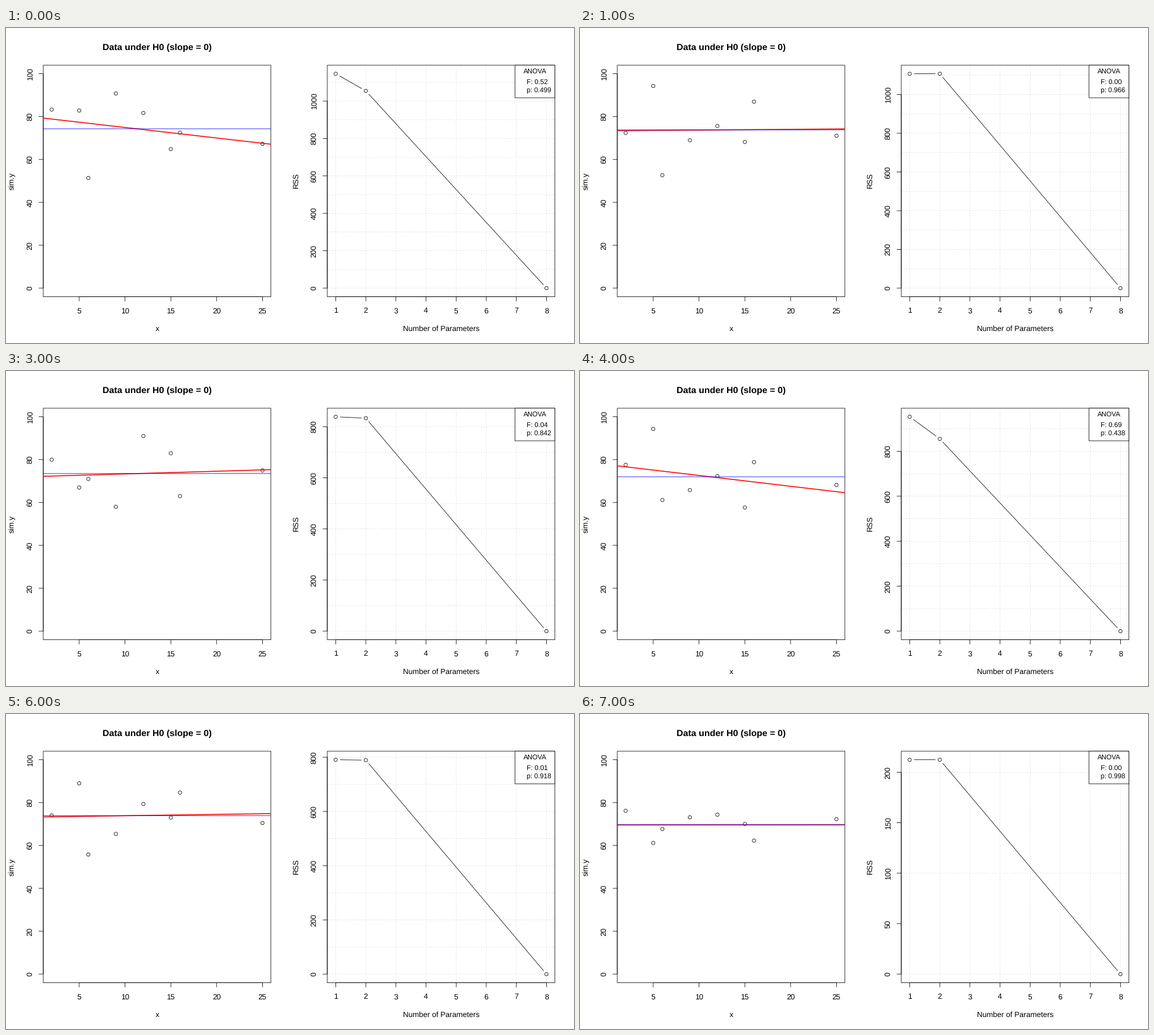
A matplotlib script that plays this animation: 900x500 px, repeating every 8 s.

```python
import matplotlib.pyplot as plt
import numpy as np
from matplotlib.animation import FuncAnimation
from matplotlib.patches import Circle, Rectangle

plt.rcParams["font.family"] = "Liberation Sans"
plt.rcParams["text.hinting"] = "none"

PT = 0.72          # points per pixel at 100 dpi
THIN = 0.75        # base line width in pixels
EM = 14.4          # height of one margin line
TOP, BOTTOM = 59.04, 426.56
LEFT_A, LEFT_B, WIDTH = 59.04, 509.04, 360.72
MID_Y = (TOP + BOTTOM) / 2

X = np.array([2, 5, 6, 9, 12, 15, 16, 25])

# simulated y values, residual sum of squares, F, p, colour of the mean line
SAMPLES = [
    ([83.3, 82.85, 51.4, 90.8, 81.7, 64.85, 72.5, 67.3], 1146, 0.52, 0.499, "blue"),
    ([72.4, 94.3, 52.7, 69.0, 75.65, 68.2, 87.0, 71.1], 1107, 0.00, 0.966, "blue"),
    ([92.25, 71.1, 91.8, 69.8, 69.0, 65.15, 65.7, 78.7], 857.5, 1.34, 0.291, "blue"),
    ([80, 67, 71, 58, 91, 83, 63, 75], 839, 0.04, 0.842, "blue"),
    ([77.6, 94.3, 61.2, 65.8, 72.3, 57.7, 78.85, 68.2], 953.5, 0.69, 0.438, "blue"),
    ([74.1, 83.75, 75.8, 79.0, 87.45, 62.95, 92.2, 63.7], 773, 0.65, 0.451, "black"),
    ([74, 89, 55.8, 65.4, 79.4, 73, 84.7, 70.5], 791, 0.01, 0.918, "blue"),
    ([76.2, 61.2, 67.7, 73.15, 74.4, 70.05, 62.3, 72.3], 212.4, 0.00, 0.998, "blue"),
]

fig = plt.figure(figsize=(9, 5), dpi=100, facecolor="white")
ax = fig.add_axes([0, 0, 1, 1])
ax.set_xlim(0, 900)
ax.set_ylim(500, 0)
ax.axis("off")


def scale(lo, hi, start, end):
    """Map lo..hi, padded by 4 % on both sides, onto start..end pixels."""
    pad = 0.04 * (hi - lo)
    return lambda v: start + (v - lo + pad) / (hi - lo + 2 * pad) * (end - start)


def line(x0, y0, x1, y1, color="black", width=THIN, z=3, **kw):
    kw.setdefault("solid_capstyle", "butt")
    return ax.plot([x0, x1], [y0, y1], color=color, lw=width * PT, zorder=z,
                   snap=False, **kw)[0]


def grid_line(x0, y0, x1, y1):
    return line(x0, y0, x1, y1, "lightgray", z=1,
                linestyle=(0, (1 / THIN, 3 / THIN)), dash_capstyle="round")


def ring(x, y):
    return ax.add_patch(Circle((x, y), 2.7, fill=False, ec="black",
                               lw=THIN * PT, zorder=4, snap=False))


def frame_box(x, y, w, h, fill="none", z=3):
    return ax.add_patch(Rectangle((x, y), w, h, fc=fill, ec="black",
                                  lw=THIN * PT, zorder=z, snap=False))


def label(x, y, s, size=12, ha="center", rotation=0, **kw):
    return ax.text(x, y, s, fontsize=size * PT, ha=ha, va="baseline",
                   rotation=rotation, rotation_mode="anchor", zorder=7, **kw)


def x_axis(ticks, to_px):
    line(to_px(ticks[0]), BOTTOM, to_px(ticks[-1]), BOTTOM)
    for t in ticks:
        line(to_px(t), BOTTOM, to_px(t), BOTTOM + EM / 2)
        label(to_px(t), BOTTOM + 1.8 * EM, str(t))


def y_axis(ticks, to_px, left):
    parts = [line(left, to_px(ticks[0]), left, to_px(ticks[-1]))]
    for t in ticks:
        parts.append(line(left - EM / 2, to_px(t), left, to_px(t)))
        parts.append(label(left - 1.2 * EM, to_px(t), str(t), rotation=90))
    return parts


ax_x = scale(2, 25, LEFT_A, LEFT_A + WIDTH)
ax_y = scale(0, 100, BOTTOM, TOP)
bx_x = scale(1, 8, LEFT_B, LEFT_B + WIDTH)


def draw_static():
    for left, xlab, ylab in ((LEFT_A, "x", "sim.y"),
                             (LEFT_B, "Number of Parameters", "RSS")):
        frame_box(left, TOP, WIDTH, BOTTOM - TOP)
        label(left + WIDTH / 2, BOTTOM + 3.8 * EM, xlab)
        label(left - 3.2 * EM, MID_Y, ylab, rotation=90)
    label(LEFT_A + WIDTH / 2, 35, "Data under H0 (slope = 0)", 14.4, weight="bold")
    x_axis(range(5, 26, 5), ax_x)
    y_axis(range(0, 101, 20), ax_y, LEFT_A)
    x_axis(range(1, 9), bx_x)
    for k in range(1, 9):
        grid_line(bx_x(k), BOTTOM, bx_x(k), TOP)

    # legend
    x0, row = 806.5, 0.9 * EM
    frame_box(x0, TOP, LEFT_B + WIDTH - x0, 4 * row, "white", z=6)
    label(x0 + 31.6, TOP + row, "ANOVA", 10.8)


def draw_data(ys, color):
    slope, start = np.polyfit(X, ys, 1)
    ends = np.array([1.08, 25.92])
    fit = start + slope * ends
    mean = ax_y(np.mean(ys))
    x0, x1 = ax_x(ends)
    parts = [ring(ax_x(x), ax_y(y)) for x, y in zip(X, ys)]
    parts.append(line(x0, ax_y(fit[0]), x1, ax_y(fit[1]), "red", 2 * THIN, z=4))
    parts.append(line(x0, mean, x1, mean, color, z=5))
    return parts


def draw_rss(rss, f, p):
    to_y = scale(0, rss, BOTTOM, TOP)
    limit = int(1.04 * rss)
    step = 50 if rss < 300 else 200
    parts = y_axis(range(0, limit + 1, step), to_y, LEFT_B)
    for v in range(0, limit + 1, 100):
        parts.append(grid_line(LEFT_B, to_y(v), LEFT_B + WIDTH, to_y(v)))

    values = (rss, rss / (1 + f / 6), 0)
    pts = [np.array([bx_x(k), to_y(v)]) for k, v in zip((1, 2, 8), values)]
    parts += [ring(*pt) for pt in pts]
    for a, b in zip(pts, pts[1:]):
        gap = (b - a) / np.hypot(*(b - a)) * EM / 2
        parts.append(line(*(a + gap), *(b - gap), solid_capstyle="round"))

    parts.append(label(825.4, 88.9, f"F: {f:.2f}", 10.8, "left"))
    parts.append(label(825.4, 101.9, f"p: {p:.3f}", 10.8, "left"))
    return parts


live = []


def clear():
    while live:
        live.pop().remove()


def update(i):
    clear()
    ys, rss, f, p, color = SAMPLES[i]
    live.extend(draw_data(ys, color) + draw_rss(rss, f, p))
    return live


draw_static()
anim = FuncAnimation(fig, update, frames=len(SAMPLES), init_func=clear,
                     interval=1000, repeat=True, repeat_delay=0, blit=False)
plt.show()
```
